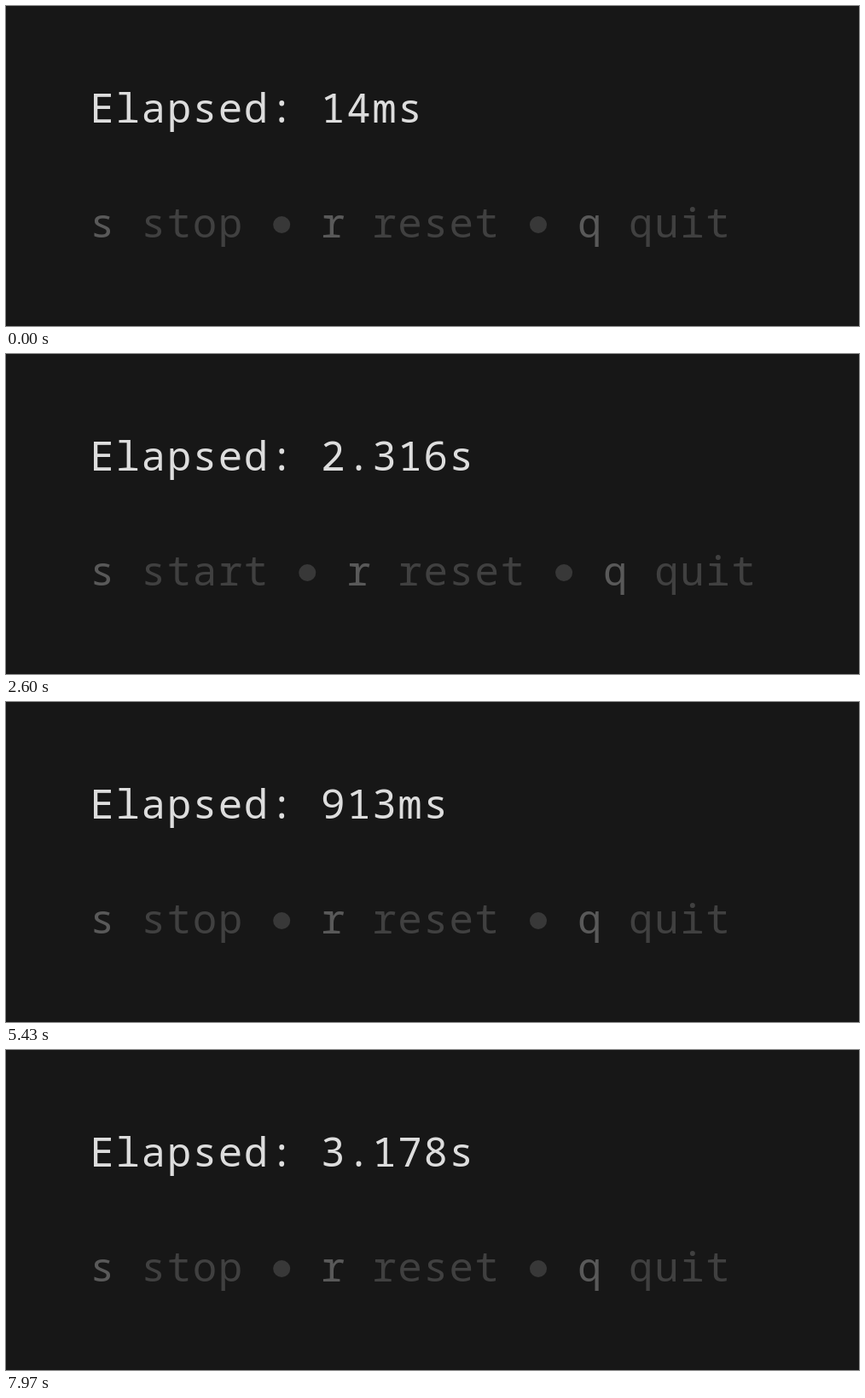
Write an HTML page that moves like this. It is 1000 px wide and 376 px high and loops after 8000 ms.

```html
<!DOCTYPE html>
<html lang="en">
<head>
<meta charset="utf-8">
<title>Stopwatch</title>
<style>
  html, body { margin: 0; width: 100%; height: 100%; overflow: hidden; background: #171717; }
  svg { display: block; width: 100%; height: 100%; }
  text {
    font: 400 47.5px "Noto Sans Mono", "Liberation Mono", monospace;
    letter-spacing: 1.58px;
    font-variant-ligatures: none;
    white-space: pre;
  }
  .time { fill: #dddddd; }
  .key { fill: #595959; }
  .desc { fill: #404040; }
  .dot { fill: #383838; }
</style>
</head>
<body>
<svg viewBox="0 0 1000 376">
  <g id="clock"></g>
  <g id="stopHelp"></g>
  <g id="startHelp"></g>
</svg>
<script>
const LOOP = 8000, CELL = 30.08, LEFT = 98.4;
const STOPPED = 78, RESET = 106, STARTED = 132;

// [tick, elapsed ms] at 30 ticks per second
const KNOTS = [
  [0, 14], [34, 1020], [77, 2291], [78, 2316], [105, 2316],
  [106, 0], [132, 0], [133, 19], [142, 287], [183, 1510], [214, 2435], [239, 3178]
];

const byId = id => document.getElementById(id);

function add(parent, tag, attrs, text = "") {
  const el = document.createElementNS("http://www.w3.org/2000/svg", tag);
  for (const name in attrs) el.setAttribute(name, attrs[name]);
  el.textContent = text;
  parent.appendChild(el);
  return el;
}

function word(parent, cls, col, y, text) {
  return add(parent, "text", { class: cls, x: LEFT + col * CELL, y }, text);
}

function buildHelp(group, toggle) {
  let col = 0;
  [["s", toggle], ["r", "reset"], ["q", "quit"]].forEach(([key, desc], i) => {
    if (i) {
      add(group, "circle", { class: "dot", cx: LEFT - 0.8 + (col + 0.5) * CELL, cy: 257, r: 10 });
      col += 2;
    }
    word(group, "key", col, 272, key);
    word(group, "desc", col + 2, 272, desc);
    col += desc.length + 3;
  });
}

function elapsed(tick) {
  const i = KNOTS.findIndex(([k]) => k >= tick);
  const [k1, v1] = KNOTS[i];
  if (k1 === tick) return v1;
  const [k0, v0] = KNOTS[i - 1];
  const ms = Math.round(v0 + (v1 - v0) * (tick - k0) / (k1 - k0));
  return ms && ms % 10 === 0 ? ms + 1 : ms;
}

function format(ms) {
  return ms > 0 && ms < 1000 ? ms + "ms" : ms / 1000 + "s";
}

word(byId("clock"), "time", 0, 137, "Elapsed:");
const value = word(byId("clock"), "time", 9, 137, "");
buildHelp(byId("stopHelp"), "stop");
buildHelp(byId("startHelp"), "start");

function draw(t) {
  const tick = Math.min(239, Math.floor((t % LOOP + 3.5) * 0.03));
  const paused = tick >= STOPPED && tick < STARTED;
  value.textContent = format(tick >= RESET && tick <= STARTED ? 0 : elapsed(tick));
  byId("stopHelp").style.display = paused ? "none" : "";
  byId("startHelp").style.display = paused ? "" : "none";
}

const begin = performance.now();
function frame() {
  draw(performance.now() - begin);
  requestAnimationFrame(frame);
}
draw(0);
requestAnimationFrame(frame);
</script>
</body>
</html>
```
